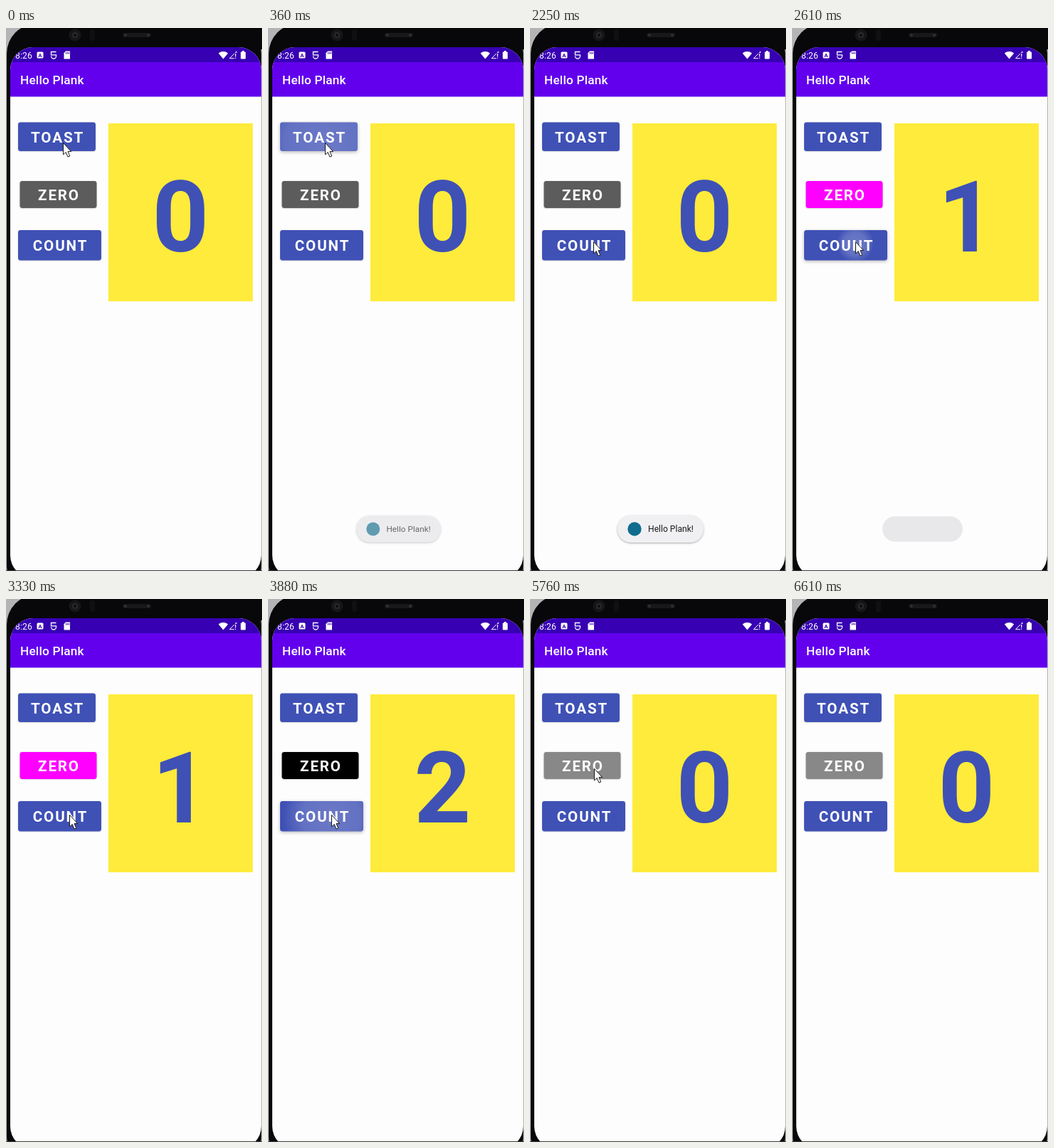
These frames come from a looping animation (360 by 763 pixels, 7140 ms). An HTML page with a canvas:

```html
<!DOCTYPE html>
<html lang="en">
<head>
<meta charset="utf-8">
<title>Counter demo</title>
<style>
html, body { margin: 0; width: 100%; height: 100%; overflow: hidden; background: #0a0a0b; }
canvas { display: block; width: 360px; height: 763px; }
</style>
</head>
<body>
<canvas id="stage"></canvas>
<script>
const W = 360, H = 763, LOOP = 7140;
const canvas = document.getElementById('stage');
const dpr = window.devicePixelRatio || 1;
canvas.width = W * dpr;
canvas.height = H * dpr;
const ctx = canvas.getContext('2d');

const BLUE = '#3f51b5', WHITE = '#fff', BAR = '#3700b3';
const LABEL = 'Hello Plank';
const HOME = { x: 80, y: 161 };

const BUTTONS = [
  { text: 'TOAST', x: 17, y: 132.5, w: 109, h: 40.5 },
  { text: 'ZERO', x: 19.5, y: 215, w: 108, h: 38 },
  { text: 'COUNT', x: 17, y: 284, w: 117, h: 42.5 }
];

// What each click shows: the digit and the colour of the ZERO button.
const CLICKS = [
  { at: 120, id: 0, digit: '0', zero: '#5c5c5c' },
  { at: 2610, id: 2, digit: '1', zero: '#ff00ff' },
  { at: 3730, id: 2, digit: '2', zero: '#000' },
  { at: 4940, id: 1, digit: '0', zero: '#888' }
];

const MOVES = [
  { from: 670, to: 1270, x: 87, y: 226 },
  { from: 1270, to: 2250, x: 89, y: 300 },
  { from: 2760, to: 3030, x: 89, y: 303 },
  { from: 4030, to: 4540, x: 90, y: 238 },
  { from: 5850, to: 6610, x: 232, y: 766 }
];

const ramp = (a, b, t) => Math.min(1, Math.max(0, (t - a) / (b - a)));
const easeOut = p => Math.sin(p * Math.PI / 2);

function pointerAt(t) {
  return MOVES.reduce((p, m) => {
    const k = easeOut(ramp(m.from, m.to, t));
    return { x: p.x + (m.x - p.x) * k, y: p.y + (m.y - p.y) * k };
  }, HOME);
}

function rounded(x, y, w, h, r) {
  ctx.beginPath();
  ctx.roundRect(x, y, w, h, r);
}

function box(x, y, w, h, color, r = 0) {
  ctx.fillStyle = color;
  rounded(x, y, w, h, r);
  ctx.fill();
}

function disc(x, y, r, color) {
  box(x - r, y - r, 2 * r, 2 * r, color, r);
}

function poly(points, color) {
  ctx.beginPath();
  points.forEach(([x, y]) => ctx.lineTo(x, y));
  ctx.closePath();
  ctx.fillStyle = color;
  ctx.fill();
}

function outline(color, width) {
  ctx.strokeStyle = color;
  ctx.lineWidth = width;
  ctx.stroke();
}

function label(text, x, y, size, weight, color, spacing = 0) {
  ctx.font = `${weight} ${size}px Roboto, sans-serif`;
  ctx.letterSpacing = spacing + 'px';
  ctx.fillStyle = color;
  ctx.fillText(text, x, y);
}

function raised(x, y, w, h, color, r, alpha, blur, dy) {
  ctx.save();
  ctx.shadowColor = `rgba(0,0,0,${alpha})`;
  ctx.shadowBlur = blur * dpr;
  ctx.shadowOffsetY = dy * dpr;
  box(x, y, w, h, color, r);
  ctx.restore();
}

function drawBezel() {
  box(0, 0, W, H, '#b4b4b6');
  box(1, -6, W - 2, H + 40, '#08080a', 42);
  box(40, 0, W - 40, 30, '#08080a');
  disc(97, 10, 8.5, '#161618');
  disc(97, 10, 4, '#2a2a2d');
  disc(97, 10, 2, '#0c0c0e');
  box(118, 2, 7, 16, '#101012', 3);
  box(164, 7, 40, 6, '#18181a', 3);
  disc(168, 10, 2, '#303033');
  disc(200, 10, 2, '#303033');
}

function drawStatusIcons() {
  label('8:26', 13, 42.5, 12.2, 400, WHITE, 0.1);

  box(43.5, 33.5, 9, 9, WHITE, 1.5);
  label('A', 45.2, 41, 8, 700, BAR);

  ctx.beginPath();
  ctx.moveTo(70.5, 33.5);
  ctx.lineTo(63.5, 33.5);
  ctx.lineTo(63.5, 37.8);
  ctx.lineTo(70.5, 37.8);
  ctx.arc(67, 39.5, 3.5, 0, Math.PI);
  outline(WHITE, 1.3);

  poly([[84, 32.5], [90, 32.5], [90, 43.5], [81.5, 43.5], [81.5, 35.2]], WHITE);
  for (let x = 84; x < 89; x += 2) box(x, 34, 1, 2.4, BAR);

  ctx.beginPath();
  ctx.moveTo(305.5, 43.5);
  ctx.arc(305.5, 43.5, 10.5, Math.PI * 1.28, Math.PI * 1.72);
  ctx.fillStyle = WHITE;
  ctx.fill();

  poly([[314.5, 42.7], [324, 42.7], [324, 33]], BAR);
  outline(WHITE, 1);
  box(321, 35, 4, 9, BAR);
  label('!', 321.5, 43, 9, 700, WHITE);

  box(330, 33.5, 7, 10, WHITE, 1);
  box(332, 32, 3, 2, WHITE);
}

function drawRipple(b, at, t) {
  const start = at - 50, age = t - start;
  const { x, y } = pointerAt(at);
  const alpha = 0.23 * (1 - ramp(350, 650, age));
  const glow = ctx.createRadialGradient(x, y + 3, 0, x, y + 3, 12 + age * 0.28);
  glow.addColorStop(0, `rgba(255,255,255,${alpha})`);
  glow.addColorStop(0.6, `rgba(255,255,255,${alpha * 0.8})`);
  glow.addColorStop(1, 'rgba(255,255,255,0)');
  box(b.x, b.y, b.w, b.h, glow, 3.4);
}

function drawButton(b, color, clicks, t) {
  const active = clicks.find(c => t >= c.at && t < c.at + 600);
  const lift = active ? 1 - ramp(300, 420, t - active.at) : 0;
  raised(b.x, b.y, b.w, b.h, color, 3.4, 0.22 + 0.06 * lift, 2 + 3 * lift, 0.6 + lift);
  if (active) drawRipple(b, active.at, t);
  ctx.textAlign = 'center';
  label(b.text, b.x + b.w / 2 + 1, b.y + b.h / 2 + 8.2, 20.6, 700, WHITE, 1.84);
  ctx.textAlign = 'left';
}

function drawToast(t) {
  const shown = ramp(150, 420, t) * (1 - ramp(2440, 2700, t));
  if (shown <= 0) return;
  const content = ramp(0.4, 1, shown);
  const scale = 0.9 + 0.1 * shown;
  ctx.save();
  ctx.translate(183.5, 704);
  ctx.scale(scale, scale);
  ctx.translate(-183.5, -704);
  ctx.globalAlpha = Math.min(1, shown * 3);
  raised(123, 685, 121, 38, '#e8e8ea', 19, 0.34 * content, 3, 1);
  ctx.globalAlpha = content;
  box(123, 685, 121, 38, '#f0f0f2', 19);
  disc(147, 704, 9.7, '#106d8d');
  label(LABEL + '!', 166, 708.3, 12.1, 400, '#1c1c1e');
  ctx.restore();
}

function drawPointer(t) {
  const { x, y } = pointerAt(t);
  ctx.save();
  ctx.translate(x, y);
  ctx.scale(1.06, 1.06);
  poly([[0.5, 0.5], [0.5, 16], [4, 12.8], [6.6, 19], [9.2, 17.9], [6.6, 11.9], [11, 11.9]], WHITE);
  outline('#111', 0.9);
  ctx.restore();
}

function draw(t) {
  const { digit, zero } = CLICKS.filter(c => c.at <= t).pop() || CLICKS[0];
  ctx.setTransform(dpr, 0, 0, dpr, 0, 0);
  drawBezel();

  ctx.save();
  rounded(6, 27, 353, 746, 32);
  ctx.clip();
  box(6, 27, 353, 746, '#fdfdfd');
  box(6, 27, 353, 21, BAR);
  box(6, 48, 353, 48.4, '#6200ee');
  drawStatusIcons();
  label(LABEL, 20, 79, 17.3, 500, WHITE, 0.15);

  box(144, 134, 203, 250, '#ffeb3b');
  ctx.textAlign = 'center';
  label(digit, 245.4, 314, 139.2, 700, BLUE);
  BUTTONS.forEach((b, i) =>
    drawButton(b, i === 1 ? zero : BLUE, CLICKS.filter(c => c.id === i), t));
  drawToast(t);
  ctx.restore();

  box(0, 762, W, 1, '#3a3a3c');
  drawPointer(t);
}

const origin = performance.now();
function loop() {
  draw((performance.now() - origin) % LOOP);
  requestAnimationFrame(loop);
}
loop();
</script>
</body>
</html>
```
